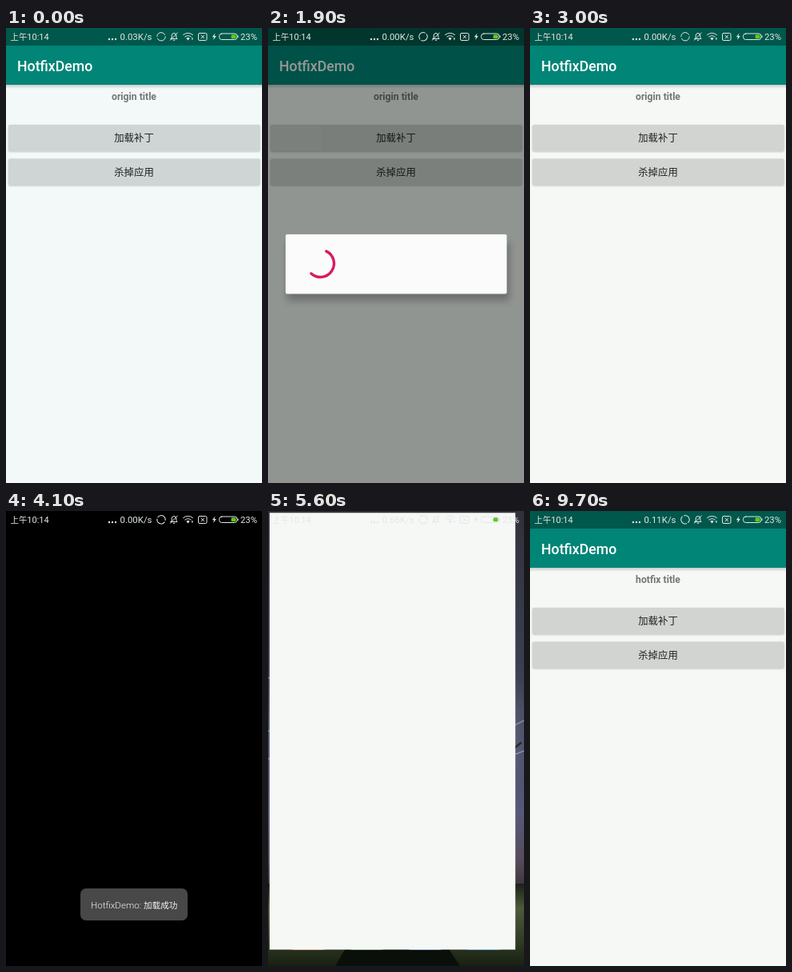
Write an HTML page that moves like this. It is 320 px wide and 569 px high and loops after 9800 ms.

```html
<!DOCTYPE html>
<html lang="zh-CN">
<head>
<meta charset="utf-8">
<title>HotfixDemo</title>
<style>
  html, body { margin: 0; width: 100%; height: 100%; overflow: hidden; background: #000; }
  svg { display: block; width: 100vw; height: 100vh; }
  text { font-family: Roboto, "Noto Sans CJK SC", "Noto Sans CJK", sans-serif; }
  .mid { text-anchor: middle; }
  .line { fill: none; stroke: #e0e8e6; stroke-width: 1; stroke-linecap: round; }
</style>
</head>
<body>
<svg viewBox="0 0 320 569">
  <defs>
    <linearGradient id="sky" x2="0" y2="1">
      <stop offset="0" stop-color="#30323a"/>
      <stop offset=".4" stop-color="#3b3e50"/>
      <stop offset=".8" stop-color="#57597a"/>
      <stop offset=".93" stop-color="#574c5a"/>
      <stop offset="1" stop-color="#3c353a"/>
    </linearGradient>
    <linearGradient id="grass" x2="0" y2="1">
      <stop offset="0" stop-color="#1b2118"/>
      <stop offset=".3" stop-color="#4e5a39"/>
      <stop offset=".6" stop-color="#38432a"/>
      <stop offset="1" stop-color="#182012"/>
    </linearGradient>
    <radialGradient id="crown">
      <stop offset="0" stop-color="#8794a2" stop-opacity=".45"/>
      <stop offset=".65" stop-color="#8794a2" stop-opacity=".4"/>
      <stop offset="1" stop-color="#8794a2" stop-opacity="0"/>
    </radialGradient>
    <linearGradient id="shade" x2="0" y2="1">
      <stop offset="0" stop-opacity=".18"/>
      <stop offset="1" stop-opacity="0"/>
    </linearGradient>
    <filter id="soft" x="-20%" y="-50%" width="140%" height="200%">
      <feGaussianBlur stdDeviation="5"/>
    </filter>
    <filter id="lift" x="-5%" y="-20%" width="110%" height="150%">
      <feGaussianBlur stdDeviation="1"/>
    </filter>
    <clipPath id="clip0"><rect x="3" y="121" width="314.5" height="33" rx="2"/></clipPath>
    <clipPath id="clip1"><rect x="3" y="163.5" width="314.5" height="33" rx="2"/></clipPath>
  </defs>

  <g id="home">
    <rect width="320" height="470" fill="url(#sky)"/>
    <rect y="466" width="320" height="103" fill="url(#grass)"/>
    <path d="M142 470H176L240 569H84Z" fill="#0b0f0a"/>
    <ellipse cx="160" cy="278" rx="178" ry="130" fill="url(#crown)"/>
    <g fill="none" stroke="#aebbc4" stroke-opacity=".6" stroke-linecap="round" stroke-width="1.4">
      <path d="M95 325Q60 285 0 275M72 313Q40 300 0 310M105 335Q85 260 0 208M92 300Q85 230 65 175M148 300Q115 240 98 168M140 265Q135 210 130 160M178 280Q172 200 190 140M182 255Q205 205 245 180M175 310Q225 260 300 225M225 350Q262 290 320 262M240 332Q280 315 320 300M215 362Q240 370 262 362"/>
    </g>
    <g fill="none" stroke="#252b29" stroke-linecap="round">
      <path stroke-width="8" d="M155 405Q158 350 149 300"/>
      <path stroke-width="5" d="M150 395Q115 340 72 313M167 405Q215 375 245 325M157 372Q180 310 182 255"/>
      <path stroke-width="2.5" d="M149 300Q128 230 138 165M142 384Q90 372 40 378M72 313Q40 280 5 278M225 360Q280 320 316 290M180 290Q220 250 243 190M115 345Q85 260 75 195"/>
    </g>
    <path d="M147 385Q151 440 143 474H173Q167 440 170 410L163 385Z" fill="#151a16"/>
    <g fill="#fff" fill-opacity=".6">
      <circle cx="142" cy="474" r="1.8"/><circle cx="154" cy="474" r="1.8"/>
      <circle cx="166" cy="474" r="1.8"/><circle cx="178" cy="474" r="1.8"/>
      <circle cx="203" cy="474" r="1.8"/>
    </g>
    <g id="icons">
      <rect id="launch" x="26" y="33" width="49" height="48" rx="7"/>
      <text class="mid" x="50.5" y="94" font-size="11" font-weight="300" fill="#fff">HotfixDemo</text>
      <rect x="26" y="500" width="49" height="49" rx="7" fill="#f0803c"/>
      <rect x="99" y="500" width="49" height="49" rx="7" fill="#41a332"/>
      <rect x="172" y="500" width="49" height="49" rx="7" fill="#4292dc"/>
      <rect x="245" y="500" width="49" height="49" rx="7" fill="#2796e8"/>
      <circle cx="290" cy="502" r="10" fill="#f4522b"/>
      <text class="mid" x="290" y="506" font-size="11" fill="#fff">10</text>
    </g>
  </g>

  <g id="app">
    <rect id="page" width="320" height="569"/>
    <g id="content">
      <rect y="71" width="320" height="5" fill="url(#shade)"/>
      <rect width="320" height="22" fill="#00574b"/>
      <rect y="22" width="320" height="49" fill="#008577"/>
      <text class="mid" id="title" x="160" y="89.5" font-size="12.2" font-weight="700" fill="#757575"></text>
      <g id="buttons"></g>
    </g>
    <text id="name" x="14" y="53.5" font-size="17.7" font-weight="500" fill="#fff">HotfixDemo</text>
  </g>

  <rect id="dim" width="320" height="569" fill="#000804"/>
  <g id="dialog">
    <rect x="24" y="268" width="278" height="73" opacity=".25" filter="url(#soft)"/>
    <rect x="22" y="258" width="276.5" height="74.5" rx="2" fill="#fafbfa"/>
  </g>
  <path id="spin" fill="none" stroke-width="3.4" stroke-linecap="round"/>

  <rect id="black" width="320" height="569"/>
  <g id="toast" fill="#f2f2f2" font-weight="300">
    <rect x="93" y="472" width="134" height="40" rx="7" fill="#484848"/>
    <text x="106" y="496.5" font-size="11.6">HotfixDemo:</text>
    <text x="172" y="496.5" font-size="10.6">加载成功</text>
  </g>

  <g id="status" fill="#e0e8e6">
    <text x="5.5" y="15" font-size="10.4">上午<tspan font-size="11">10:14</tspan></text>
    <circle cx="129" cy="14" r="1.2"/><circle cx="133" cy="14" r="1.2"/><circle cx="137" cy="14" r="1.2"/>
    <text id="speed" x="182.5" y="15" font-size="11.4" text-anchor="end"></text>
    <circle id="sync" class="line" cx="194" cy="10.8" r="5.2" pathLength="360" stroke-dasharray="152 28"/>
    <path class="line" d="M206 13.5H214L212.8 11.7V9Q212.3 6.5 210 6.5T207.2 9V11.7ZM209.2 15.3H210.8M205.5 15.2L214.3 6"/>
    <path class="line" stroke-width="1.5" d="M221.5 8.5Q227.5 4 233.5 8.5M223.7 11Q227.5 8.2 231.3 11"/>
    <path d="M225.3 12.8Q227.5 11.3 229.7 12.8L227.500 15.500ZM231.8 12.500H234L232.900 15.500Z"/>
    <path class="line" d="M242 6.5H249.5Q251 6.5 251 8V14Q251 15.5 249.5 15.5H242Q240.500 15.500 240.500 14V8Q240.500 6.500 242 6.500ZM244 9.200L247.600 12.800M247.600 9.200L244 12.800"/>
    <path d="M261.5 6.5L257.8 11.300H260L259.200 15L262.800 10H260.500Z"/>
    <rect class="line" x="266.5" y="7" width="22.500" height="7.500" rx="3.200"/>
    <rect x="289.3" y="9.500" width="1.200" height="2.500"/>
    <rect x="281.5" y="8.300" width="6" height="5" rx="1.500" fill="#5fc81c"/>
    <text x="293" y="15" font-size="11.3">23%</text>
  </g>
</svg>
<script>
const LOOP = 9800, STEP = 100;
const $ = id => document.getElementById(id);
const set = (id, attrs) => {
  for (const key in attrs) $(id).setAttribute(key, attrs[key]);
};
const show = (id, alpha) => set(id, { opacity: alpha, visibility: alpha > 0 ? "visible" : "hidden" });
const clamp = v => Math.min(1, Math.max(0, v));

// Piecewise linear value through [time, value] points.
function ramp(t, ...points) {
  let [t0, v0] = points[0];
  for (const [t1, v1] of points) {
    if (t < t1) return t1 === t0 ? v0 : v0 + (v1 - v0) * clamp((t - t0) / (t1 - t0));
    [t0, v0] = [t1, v1];
  }
  return v0;
}

$("buttons").innerHTML = ["加载补丁", "杀掉应用"].map((label, i) => {
  const y = 121 + i * 42.5;
  return `<rect id="lift${i}" x="3" y="${y + 0.7}" width="314.5" height="33.3" rx="2" fill="#000" filter="url(#lift)"/>
    <rect x="3" y="${y}" width="314.5" height="33" rx="2"/>
    <circle id="ripple${i}" cx="${i ? 160 : 210}" cy="${y + 16.5}" fill="#000" clip-path="url(#clip${i})"/>
    <text class="mid" x="160" y="${y + 21.2}" font-size="12.4" fill="#222">${label}</text>`;
}).join("");

function press(i, t, start) {
  const u = (t - start) / 400;
  const alpha = u < 0 ? 0 : 0.055 * clamp(2 - u);
  set("ripple" + i, { r: Math.max(0, 10 + 76 * u) });
  show("ripple" + i, alpha);
  show("lift" + i, 0.2 + alpha * 4);
}

function spinner(t) {
  const u = clamp((t - 1600) / 1000);
  const tail = -90 + 283 * u * u;
  const head = Math.max(tail + 0.5, -90 + 437 * (1 - (1 - u) ** 2));
  const at = deg => {
    const a = deg * Math.PI / 180;
    return `${65.5 + 17 * Math.cos(a)} ${294.5 + 17 * Math.sin(a)}`;
  };
  set("spin", {
    d: `M${at(tail)}A17 17 0 ${head - tail > 180 ? 1 : 0} 1 ${at(head)}`,
    stroke: t < 1700 ? "#c4c4c4" : "#d81b60"
  });
  show("spin", ramp(t, [1500, 0], [1600, 1], [2400, 1], [2600, 0.4], [2800, 0]));
}

function home(t) {
  show("home", t < 5700 ? ramp(t, [4200, 0], [4600, 1]) : 0);
  const s = ramp(t, [4200, 0.85], [4700, 1]);
  set("icons", { transform: `translate(160 285) scale(${s}) translate(-160 -285)` });
  set("launch", { fill: t > 5100 ? "#12806a" : "#18a689" });
}

function app(t) {
  const first = t < 4100;
  const zoom = first ? 1 : 1 - (1 - clamp((t - 5200) / 500)) ** 2;
  set("app", { transform: `translate(${50 * (1 - zoom)} ${57 * (1 - zoom)}) scale(${zoom})` });
  show("app", zoom > 0 ? 1 : 0);
  const loaded = first ? 1 : ramp(t, [7100, 0], [7200, 0.7], [7300, 0.84], [7400, 0.94], [7500, 1]);
  show("content", loaded);
  show("name", loaded > 0 ? 1 : 0);
  $("title").textContent = first ? "origin title" : "hotfix title";
  const cool = t < 1100;
  set("page", { fill: cool ? "#f3f9f9" : "#f6f8f6" });
  set("buttons", { fill: cool ? "#ced5d4" : "#d2d4d2" });
  press(0, t, 1200);
  press(1, t, 3500);
}

function draw(t) {
  home(t);
  app(t);
  show("dim", ramp(t, [1600, 0], [2000, 0.55], [2400, 0.55], [2600, 0.42], [2900, 0]));
  show("dialog", ramp(t, [1500, 0], [1600, 0.4], [1900, 1], [2400, 1], [2600, 0.2], [2800, 0]));
  spinner(t);
  show("black", t < 4100 ? 0 : ramp(t, [4200, 1], [4600, 0]));
  show("toast", ramp(t, [3100, 0], [3400, 1], [4700, 1], [5000, 0]));
  $("speed").textContent =
    (t < 1200 ? "0.03" : t < 5200 ? "0.00" : t < 9200 ? "0.68" : "0.11") + "K/s";
  set("sync", { transform: `rotate(${t * 0.36} 194 10.8)` });
}

const begin = performance.now();
function tick() {
  const t = (performance.now() - begin) % LOOP;
  draw(Math.floor(t / STEP) * STEP);
  requestAnimationFrame(tick);
}
tick();
</script>
</body>
</html>
```
